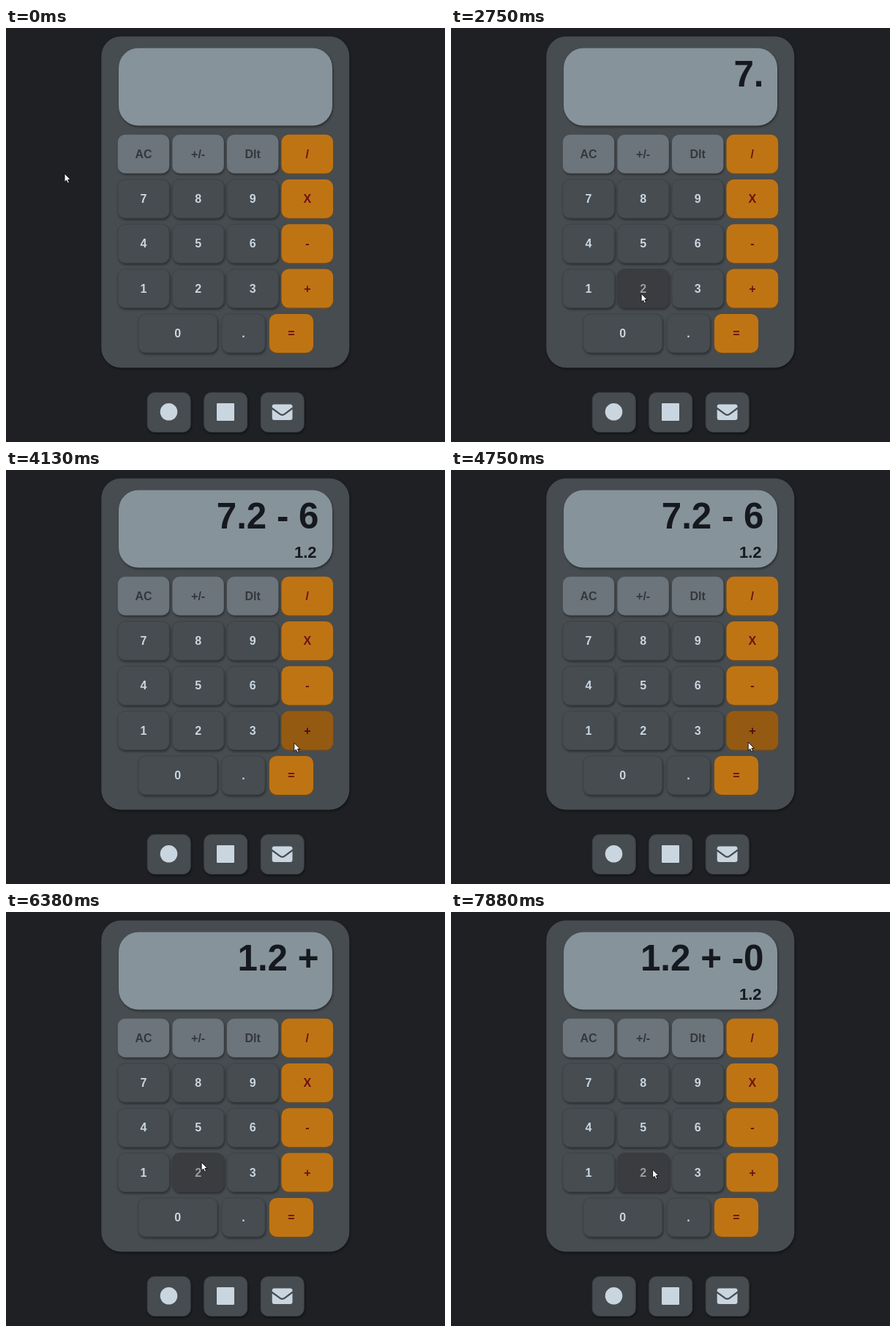
These frames come from a looping animation (600 px wide and 566 px high, 8 s). An HTML page:

```html
<!DOCTYPE html>
<html lang="en">
<head>
<meta charset="utf-8">
<title>Calculator</title>
<style>
html, body { margin: 0; width: 100%; height: 100%; overflow: hidden; background: #1f2024; }
svg { display: block; width: 600px; height: 566px; }
text { font: bold 16px "Liberation Sans", Arial, sans-serif; text-anchor: middle; white-space: pre; }
.panel, .screen, .key { filter: drop-shadow(1px 2px 1.5px #0006); }
.panel { fill: #464c50; }
.screen { fill: #86939a; }
.digit { fill: #c9d6e0; }
.digit > .cap { fill: #464c50; stroke: #3d4346; }
.tool { fill: #34383d; }
.tool > .cap { fill: #6c747c; }
.op { fill: #6c1210; }
.op > .cap { fill: #bf7414; }
.key.op { filter: drop-shadow(.5px 1px 1px #7a4a10); }
.hover.digit { fill: #999da1; }
.hover > .cap { fill: #3a3c40; stroke: #393c40; }
.hover.tool > .cap { fill: #596067; stroke: none; }
.hover.op { fill: #4c100d; }
.hover.op > .cap { fill: #955a11; stroke: none; }
#entry, #result { text-anchor: end; fill: #15191f; }
#entry { font-size: 49.3px; }
#result { font-size: 22px; }
</style>
</head>
<body>
<svg viewBox="0 0 600 566">
  <rect class="panel" x="130.3" y="11.5" width="339" height="453" rx="27"/>
  <rect class="screen" x="154" y="27.5" width="292" height="106" rx="27"/>
  <text id="entry" x="427.5" y="79.5"></text>
  <text id="result" x="424.5" y="119.5"></text>
  <g id="keys"></g>
  <path id="cursor" d="M0 0V11.5L2.6 9.2L4.4 13.2L6.4 12.3L4.7 8.4H8.2Z" fill="#fff" stroke="#111"/>
</svg>
<script>
const STEP = 125, STEPS = 64;
const $ = id => document.getElementById(id);
const keys = {};

function addKey(name, kind, x, y, w, content, h = 53) {
  const g = document.createElementNS("http://www.w3.org/2000/svg", "g");
  g.setAttribute("class", "key " + kind);
  g.innerHTML = `<rect class="cap" x="${x - w / 2}" y="${y - h / 2}" width="${w}" height="${h}" rx="10"/>${content}`;
  $("keys").append(g);
  keys[name] = { g, x, y, w, h };
}

function addLabel(label, kind, x, y, w) {
  addKey(label, kind, x, y, w, `<text x="${x}" y="${Math.round(y + 5.6)}">${label}</text>`);
}

[["AC", "+/-", "Dlt", "/"], ["7", "8", "9", "X"], ["4", "5", "6", "-"], ["1", "2", "3", "+"]]
  .forEach((row, r) => row.forEach((label, c) =>
    addLabel(label, c == 3 ? "op" : r ? "digit" : "tool", 188 + c * 74.6, 172.2 + r * 61.3, 70.5)));
addLabel("0", "digit", 234.8, 417.4, 108);
addLabel(".", "digit", 324.5, 417.4, 59);
addLabel("=", "op", 390, 417.4, 60);

const icons = {
  code: '<circle cx="222.5" cy="524.8" r="11.8"/>',
  profile: '<rect x="288" y="513" width="24" height="24" rx="1"/>',
  mail: '<rect x="363.7" y="514.5" width="27.8" height="21.5" rx="3"/>' +
    '<path d="M363 519.5L374.5 527.8Q377.6 530 380.7 527.8L392 519.5" fill="none" stroke="#464c50" stroke-width="2.2"/>'
};
Object.entries(icons).forEach(([name, icon], i) =>
  addKey(name, "digit", 222.7 + i * 77.5, 525.4, 59, icon, 54));

// The pointer's stops, each placed relative to a key's centre
const stops = [];
const move = (step, key, dx = 0, dy = 0) =>
  stops.push({ step, key, x: keys[key].x + dx, y: keys[key].y + dy });
const press = (...stop) => { move(...stop); stops.at(-1).pressed = true; };

move(0, "7", -108, -34.5);
move(4, "/");
move(7, "mail");
move(8, "profile");
press(10, "7", 11, 1.5);
move(13, "X");
move(16, "=");
press(17, ".");
move(22, "2", -2.5, 7);
press(23, "2");
press(27, "-");
press(31, "6");
move(33, "+", -18, 17);
move(35, "=");
move(37, "+");
press(40, "=");
move(43, "+", -3, 26);
press(45, "+");
move(51, "2", 4.5, -14);
move(54, "=", 43, 10);
press(58, "+/-");
move(61, "+");
move(63, "2", 13, -4);

function solve(entry) {
  const [a, op, b] = entry.split(" ");
  return b ? String(+(op == "+" ? +a + +b : a - b).toFixed(6)) : "";
}

function type(entry, key) {
  if (key == "=") return solve(entry);
  if (key == "+/-") return entry + "-0";
  return "+-X/".includes(key) ? `${entry} ${key} ` : entry + key;
}

function pointerAt(step) {
  const i = Math.max(1, stops.findIndex(s => s.step >= step));
  const a = stops[i - 1], b = stops[i];
  const t = (step - a.step) / (b.step - a.step);
  const k = t * t * (3 - 2 * t);
  return [a.x + (b.x - a.x) * k, a.y + (b.y - a.y) * k];
}

function draw(now) {
  const step = Math.floor(now / STEP) % STEPS;
  const [px, py] = pointerAt(step);
  $("cursor").setAttribute("transform", `translate(${px} ${py})`);
  for (const { g, x, y, w, h } of Object.values(keys))
    g.classList.toggle("hover", Math.abs(px - x) < w / 2 && Math.abs(py - y) < h / 2 - 1);
  const entry = stops.filter(s => s.pressed && s.step <= step).reduce((text, s) => type(text, s.key), "");
  $("entry").textContent = entry.trimEnd();
  $("result").textContent = solve(entry);
}

const start = performance.now();
function tick() {
  draw(performance.now() - start);
  requestAnimationFrame(tick);
}
tick();
</script>
</body>
</html>
```
